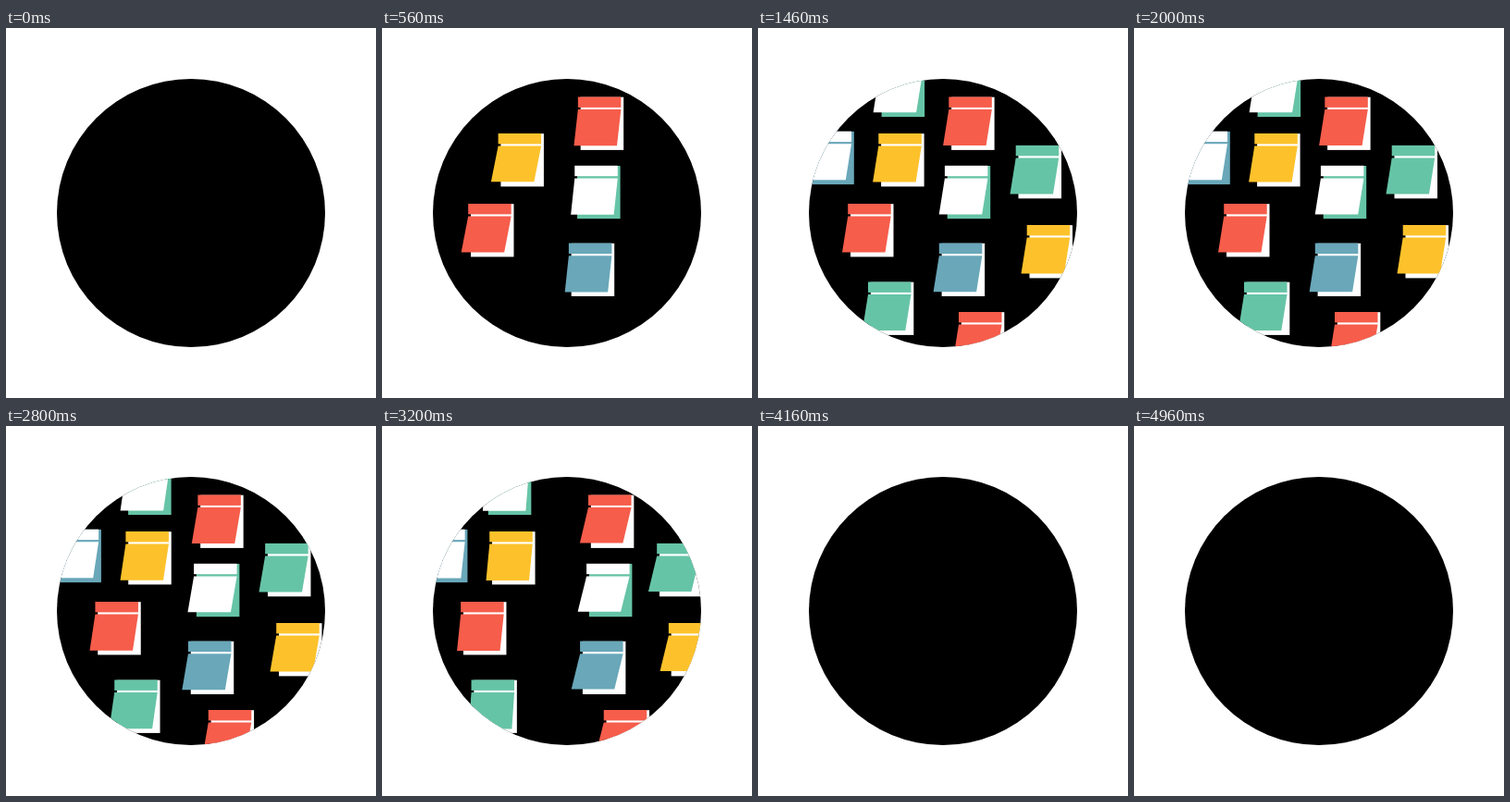
An HTML page for the animation above (5000 ms loop, 400 by 400 pixels).

```html
<!DOCTYPE html>
<html lang="en">
<head>
<meta charset="utf-8">
<title>Notes</title>
<style>
html, body { margin: 0; width: 100%; height: 100%; overflow: hidden; background: #fff; }
svg { display: block; width: 100vw; height: 100vh; }
</style>
</head>
<body>
<svg id="stage" viewBox="0 0 400 400">
  <clipPath id="disc"><circle cx="200" cy="200" r="145"/></clipPath>
  <circle cx="200" cy="200" r="145"/>
  <g id="notes" clip-path="url(#disc)"></g>
</svg>
<script>
const LOOP = 5000;
const RED = '#f65d4b', YELLOW = '#fdc22b', GREEN = '#66c4a6', BLUE = '#69a7b9', WHITE = '#fff';
const W = 46.5, STRIP = 11.4, HINGE = 13.6, FLAP = 39.5, REST = -6.2;

// Each wave: entry start and length, exit start and length, in ms.
const WAVES = [
  { enter: 0, enterFor: 1000, leave: 2400, leaveFor: 1386 },
  { enter: 445, enterFor: 1000, leave: 2350, leaveFor: 1386 }
];

// x, y at rest; travel (sign gives the side); wave; front and back colours.
const NOTES = [
  [206.3, 74.5, 150, 0, RED, WHITE],
  [130.3, 114, -126, 0, YELLOW, WHITE],
  [97.2, 190, -108, 0, RED, WHITE],
  [201.9, 148.8, 172, 0, WHITE, GREEN],
  [195.8, 232.6, 164, 0, BLUE, WHITE],
  [130.8, 38.7, -132, 1, WHITE, GREEN],
  [54.5, 111.7, -80, 1, WHITE, BLUE],
  [119, 274.5, -158, 1, GREEN, WHITE],
  [278.7, 126.9, 130, 1, GREEN, WHITE],
  [290.7, 213, 135, 1, YELLOW, WHITE],
  [217, 307, 160, 1, RED, WHITE]
];

const layer = document.getElementById('notes');

function add(parent, tag, attrs) {
  const el = document.createElementNS('http://www.w3.org/2000/svg', tag);
  for (const key in attrs) el.setAttribute(key, attrs[key]);
  parent.appendChild(el);
  return el;
}

const notes = NOTES.map(([x, y, travel, wave, front, back]) => {
  const group = add(layer, 'g', {});
  add(group, 'rect', { x: 2.8, y: 0.2, width: W, height: 57.2, fill: back });
  add(group, 'rect', { width: W, height: STRIP, fill: front });
  const flap = add(group, 'path', { fill: front });
  return { x, y, travel, wave: WAVES[wave], group, flap };
});

const unit = v => Math.min(1, Math.max(0, v));

// Share of the travel still away from rest, and its rate per second.
function away(t, w) {
  const left = 1 - unit((t - w.enter) / w.enterFor);
  const gone = unit((t - w.leave) / w.leaveFor);
  return {
    pos: left ** 4 + gone ** 4,
    rate: (4 * gone ** 3 / w.leaveFor - 4 * left ** 3 / w.enterFor) * 1000
  };
}

function draw(t) {
  for (const n of notes) {
    const { pos, rate } = away(t, n.wave);
    const lean = REST - 8 * Math.tanh(rate * n.travel / 220);
    const bottom = HINGE + Math.sqrt(FLAP ** 2 - lean ** 2);
    const hidden = t < n.wave.enter || pos >= 1;
    n.group.setAttribute('visibility', hidden ? 'hidden' : 'visible');
    n.group.setAttribute('transform', `translate(${n.x + n.travel * pos} ${n.y})`);
    n.flap.setAttribute('d', `M0 ${HINGE}H${W}L${W + lean} ${bottom}H${lean}Z`);
  }
}

const start = performance.now();
function tick() {
  draw((performance.now() - start) % LOOP);
  requestAnimationFrame(tick);
}
tick();
</script>
</body>
</html>
```
